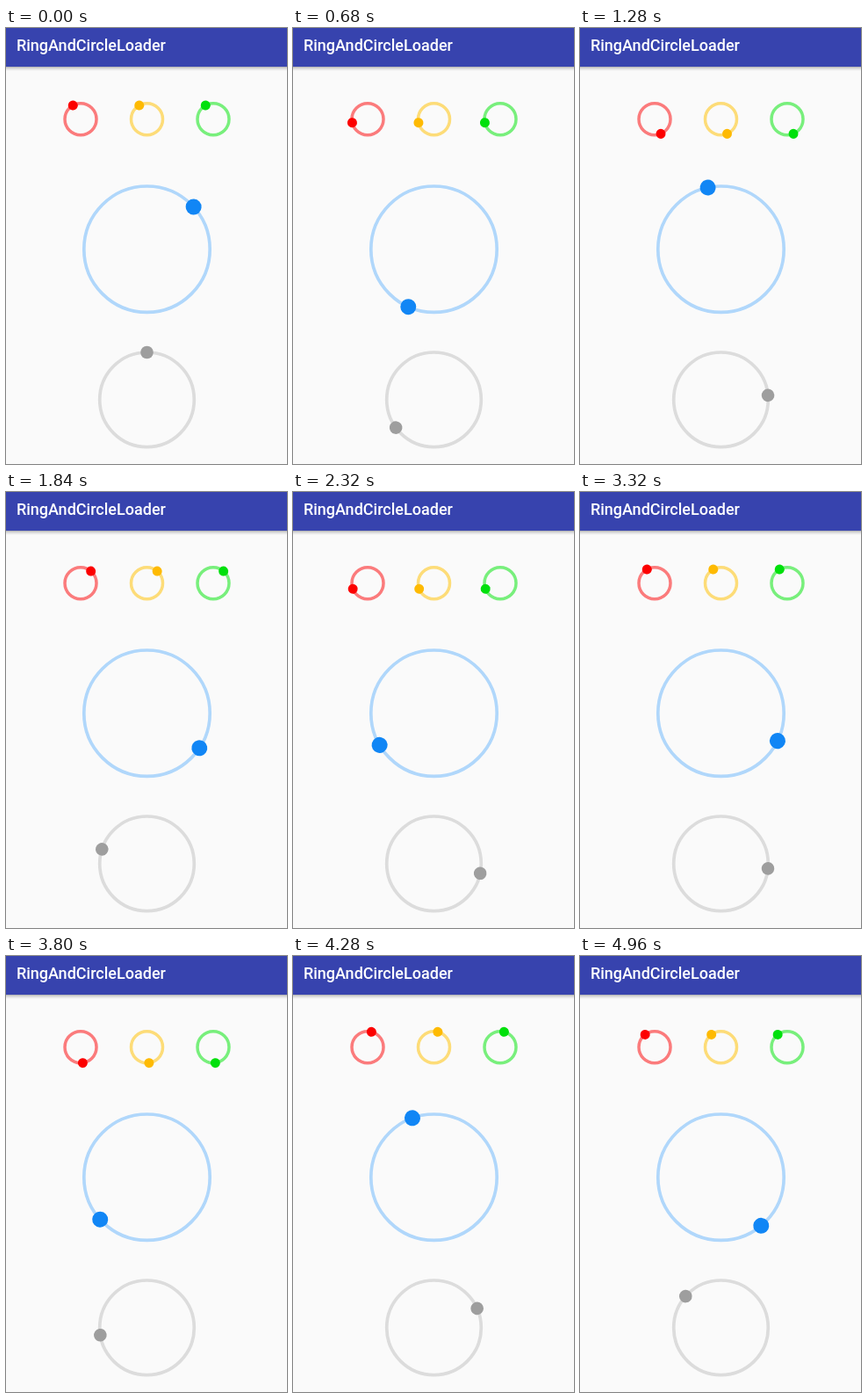
Animation of 320x496 px, one loop 5000 ms. Source, as an HTML page:

```html
<!DOCTYPE html>
<html lang="en">
<head>
<meta charset="utf-8">
<title>RingAndCircleLoader</title>
<style>
html, body { margin: 0; width: 100%; height: 100%; overflow: hidden; background: #fafafa; }
svg { display: block; width: 100%; height: 100%; }
text { font: 500 18px Roboto, sans-serif; fill: #fff; }
</style>
</head>
<body>
<svg id="stage" viewBox="0 0 320 496">
  <defs>
    <linearGradient id="shade" x1="0" y1="0" x2="0" y2="1">
      <stop offset="0" stop-color="#000" stop-opacity=".3"/>
      <stop offset=".4" stop-color="#000" stop-opacity=".12"/>
      <stop offset="1" stop-color="#000" stop-opacity="0"/>
    </linearGradient>
  </defs>
  <rect width="320" height="496" fill="#fafafa"/>
  <rect y="44" width="320" height="5" fill="url(#shade)"/>
  <rect width="320" height="44" fill="#3743ae"/>
  <text x="12" y="26">RingAndCircleLoader</text>
</svg>
<script>
const LOOP = 5000, STEP = 40;
const stage = document.getElementById("stage");

// Clockwise degrees from the top, unwrapped, at each time in ms.
const times = [0, 680, 1280, 2320, 3320, 4280, 4960];
const small = [331, 617.5, 877, 1329, 1771, 2174, 2483];
const large = [47.8, 204, 348, 599.7, 836, 1060, 1220.3];
const medium = [0, 233.7, 444.7, 821.8, 1175.9, 1506, 1751.6];

function circle(attrs) {
  const el = document.createElementNS("http://www.w3.org/2000/svg", "circle");
  for (const name in attrs) el.setAttribute(name, attrs[name]);
  return stage.appendChild(el);
}

function loader(cx, cy, r, width, dotR, ring, fill, turns) {
  circle({ cx, cy, r, fill: "none", stroke: ring, "stroke-width": width });
  const dot = circle({ cx, cy: cy - r, r: dotR, fill });
  return { dot, cx, cy, turns };
}

const loaders = [
  loader(85, 103.8, 18, 3.5, 5.5, "#fb7b7c", "#fc0000", small),
  loader(160.5, 103.8, 18, 3.5, 5.5, "#fddc78", "#feba02", small),
  loader(236, 103.8, 18, 3.5, 5.5, "#78ef7c", "#00e00c", small),
  loader(160.5, 251.7, 71.7, 3.7, 9, "#b0d7fb", "#1186f5", large),
  loader(160.5, 422.8, 53.8, 3.7, 7.3, "#dcdcdc", "#9e9e9e", medium)
];

function angleAt(turns, t) {
  let i = 0;
  while (i < times.length - 2 && t >= times[i + 1]) i++;
  const k = (t - times[i]) / (times[i + 1] - times[i]);
  return turns[i] + (turns[i + 1] - turns[i]) * k;
}

function draw(now) {
  const t = Math.floor((now % LOOP) / STEP) * STEP;
  for (const { dot, cx, cy, turns } of loaders)
    dot.setAttribute("transform", `rotate(${angleAt(turns, t)} ${cx} ${cy})`);
}

let start;
function tick(now) {
  start ??= now;
  draw(now - start);
  requestAnimationFrame(tick);
}
draw(0);
requestAnimationFrame(tick);
</script>
</body>
</html>
```
